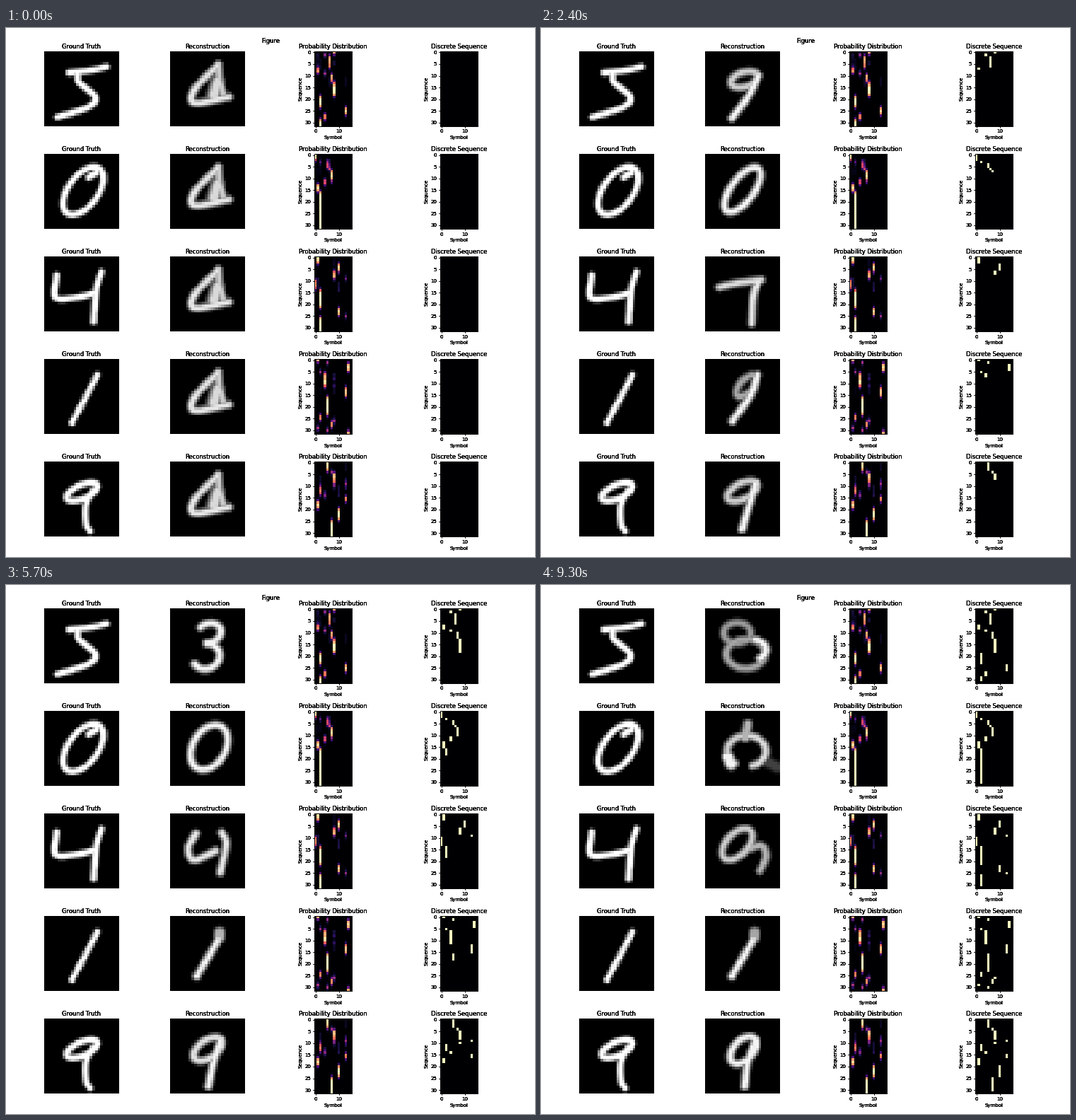
Recreate the animation shown at these times as a matplotlib script. Size 748 by 748 pixels, loop 9600 ms.

```python
import numpy as np
import matplotlib.pyplot as plt
from matplotlib.animation import FuncAnimation

STAGE, DPI = 748, 50
STEPS, SYMBOLS, GRID = 32, 16, 28
SIDE, LEFT, TOP = 105.8, 53.6, 32.8
COL_PITCH, ROW_PITCH = 178, 145.1
DIGITS = ("five", "zero", "four", "one", "nine")

grid_y, grid_x = np.mgrid[0:GRID, 0:GRID] + 0.5


def brush(x, y, w=1.35, soft=1.7, a=0.95):
    """Paint a sampled curve onto the pixel grid with a soft round tip."""
    dist = np.hypot(grid_x[..., None] - x, grid_y[..., None] - y).min(-1)
    return a * np.clip((w - dist) / soft + 0.5, 0, 1)


def line(*xy, **style):
    """Smooth curve through a few points."""
    p = np.array(xy, float).reshape(-1, 2)
    p = np.vstack([2 * p[0] - p[1], p, 2 * p[-1] - p[-2]])
    t = np.linspace(0, 1, 16)[:, None]
    curve = np.vstack([
        b + 0.5 * t * (c - q + t * (2 * q - 5 * b + 4 * c - d + t * (3 * (b - c) + d - q)))
        for q, b, c, d in zip(p, p[1:], p[2:], p[3:])])
    return brush(*curve.T, **style)


def arc(x, y, rx, ry, lean=0, start=0, end=1, **style):
    """Part of a leaning ellipse; angles in turns, clockwise from the right."""
    t = 2 * np.pi * np.linspace(start, end, 60)
    return brush(x + rx * np.cos(t) - lean * ry * np.sin(t), y + ry * np.sin(t), **style)


def merge(*strokes):
    return np.max(strokes, axis=0)


# Handwritten digits
pen = dict(w=1.2, soft=1.2, a=1)
truth = {
    "five": merge(line(23.2, 5.8, 18, 7, 9.3, 8, **pen),
                  line(12.7, 8, 13, 11.5, 19, 17, 16.5, 20.8, 5, 24.6, **pen)),
    "zero": merge(arc(14.6, 13.8, 6.4, 8.9, 0.45, **pen), line(19.5, 7, 16.6, 8.8, **pen)),
    "four": merge(line(4.7, 7, 4.3, 15.3, 12, 15.3, 18.5, 13.8, **pen),
                  line(21.4, 5.8, 19.5, 12.5, 18.5, 24.3, **pen)),
    "one": line(19.9, 6, 10.4, 23.8, **pen),
    "nine": merge(arc(14.2, 11.3, 4.6, 3.4, 1, **pen),
                  line(18.5, 10.5, 15.6, 16, 15.6, 23, 17.1, 26, **pen)),
}

# Guesses at key steps, faded into each other
first = merge(line(18, 5, 9, 14.5, 9.5, 19.3, 22, 17, a=0.9),
              line(18, 5, 18.5, 11, 20, 16, a=0.8),
              line(17.8, 11.5, 16.3, 16.5, w=2.3, soft=2.5, a=0.85))
slim = merge(arc(13.8, 13, 4.3, 7.9, 0.6, a=0.85), line(16.5, 9, 13, 19, a=0.55))
poses = {name: {0: first, 3: slim} for name in DIGITS}

three = merge(arc(14.5, 9.3, 4.4, 3.7, 0.2, -0.4, 0.25), arc(13.5, 18, 5, 4.7, 0.1, -0.25, 0.4))
poses["five"].update({
    8: merge(arc(14.7, 10.5, 4.7, 3, 0.6, a=0.8), line(20, 9, 16, 17, 10, 25)),
    12: merge(arc(16.5, 9.7, 4.2, 3.2, 0.5, a=0.85), arc(13, 18, 5.2, 4.8, 0.1, -0.25, 0.4)),
    19: three,
    26: three,
    31: merge(arc(12, 9.2, 5, 3.8, a=0.6), arc(15.2, 17, 7.2, 5.5, a=0.65),
              arc(17, 15.5, 5.8, 4, 0, -0.2, 0.15)),
})

for step in (8, 12, 19, 26):
    t = (step - 8) / 18
    poses["zero"][step] = arc(14 + t, 13.4 + 0.4 * t, 5 + 2.6 * t, 8.3, 0.55 - 0.45 * t)
poses["zero"][31] = merge(
    arc(15.5, 15, 7.2, 5.8, 0, -0.22, 0.2, a=0.85), arc(15.5, 15, 7.2, 5.8, 0, 0.35, 0.7, a=0.8),
    line(16, 5, 15, 10, w=1.7, a=0.7), line(8.5, 17, 9.7, 20, w=2),
    line(23, 19, 27, 21, w=2, a=0.25))

final_four = merge(arc(12, 11.5, 4.8, 5.8, 0.5, a=0.8),
                   line(16, 13.5, 21, 12, 22.8, 16, 20.5, 21.5, a=0.7))
poses["four"].update({
    3: merge(arc(13.7, 10.6, 4.4, 4.7, 0.1), arc(13.7, 18.5, 4.6, 4.6, 0.1, a=0.85)),
    8: merge(line(5.3, 11.5, 12, 10, 21, 8.8, a=0.85), line(20, 9.3, 18, 15, 17.4, 25, a=0.9)),
    12: merge(arc(10.5, 12.3, 3.6, 3, 0, 0.2, 0.8, a=0.6), line(11, 15, 18, 14.5, a=0.3),
              line(22.4, 7.4, 18.6, 14.5, 17.2, 24.3, a=0.85)),
    19: merge(line(9.7, 7.5, 6.8, 13, 9, 17.4, 17, 14, a=0.9),
              line(19.3, 7.2, 21, 11.5, 18.8, 22, a=0.9)),
    26: final_four,
    31: final_four,
})

poses["one"].update({
    8: merge(arc(15.5, 10, 3, 4, 0.6, a=0.65), line(19.6, 6, 17, 13.5, 10.2, 23.2)),
    12: line(19.8, 6, 10, 23.8),
})
for step, blob in ((19, 0.7), (26, 0.3), (31, 0.65)):
    poses["one"][step] = merge(line(18, 9, 10, 22.5), line(18.5, 6.2, 18.4, 8, w=2, a=blob))

for step in (8, 12, 19, 31):
    t = (step - 8) / 23
    poses["nine"][step] = merge(
        arc(14 + 0.3 * t, 11 + 0.8 * t, 4.7 - 0.4 * t, 3.8 + 1.3 * t, 0.8 - 0.35 * t, a=0.8 + 0.15 * t),
        line(19, 8, 16.6 - 0.6 * t, 16, 13.8 + t, 25.4))

# Long holds as (symbol, first step, count)
holds = {
    "five": ((6, 2, 5), (8, 14, 5), (2, 19, 5), (13, 24, 3), (2, 29, 3)),
    "zero": ((7, 7, 4), (1, 13, 3), (2, 16, 16)),
    "four": ((10, 3, 3), (8, 6, 3), (2, 14, 8), (10, 22, 3), (2, 26, 6)),
    "one": ((4, 6, 6), (13, 12, 4), (5, 16, 8)),
    "nine": ((8, 5, 4), (1, 17, 3), (10, 20, 5)),
}
rng = np.random.default_rng(8)


def sequence(name):
    """One-hot steps: the long holds, with short random runs between them."""
    symbols = rng.choice([0, 1, 2, 4, 5, 6, 7, 8, 13, 14], STEPS // 2)
    symbols = np.repeat(symbols, rng.integers(1, 4, STEPS // 2))
    symbols = np.resize(symbols, STEPS)
    for symbol, start, count in holds[name]:
        symbols[start:start + count] = symbol
    return np.eye(SYMBOLS)[symbols]


def likelihood(code):
    """Blur the steps in time and add a few faint rivals."""
    kernel = (0.1, 0.2, 0.4, 0.2, 0.1)
    padded = np.pad(code, ((2, 2), (0, 0)), mode="edge")
    p = sum(k * padded[i:i + STEPS] for i, k in enumerate(kernel))
    used = np.flatnonzero(code.any(0))
    for _ in range(5):
        start = rng.integers(0, 14)
        p[start:start + rng.integers(2, 6), rng.choice(used)] += rng.uniform(0.1, 0.25)
    p **= 1.5
    return p / p.sum(1, keepdims=True)


codes = {name: sequence(name) for name in DIGITS}


def guess(name, step):
    keys = sorted(poses[name])
    at = np.interp(step, keys, range(len(keys)))
    i = min(int(at), len(keys) - 2)
    f = at - i
    return (1 - f) * poses[name][keys[i]] + f * poses[name][keys[i + 1]]


def revealed(name, step):
    return codes[name] * (np.arange(STEPS) < step)[:, None]


def darken(*artists, times=4):
    """Draw artists repeatedly so that their soft edges grow heavier."""
    for artist in artists:
        def repeat(renderer, draw=artist.draw):
            for _ in range(times):
                draw(renderer)

        artist.draw = repeat


fig = plt.figure(figsize=(STAGE / DPI, STAGE / DPI), dpi=DPI, facecolor="white")
darken(fig.suptitle("Figure", y=1 - 14 / STAGE), times=6)


def panel(row, col, title, data, cmap):
    plain = cmap == "gray"
    width = SIDE if plain else SIDE / 2
    left = LEFT + COL_PITCH * col + (SIDE - width) / 2
    bottom = STAGE - TOP - ROW_PITCH * row - SIDE
    ax = fig.add_axes([v / STAGE for v in (left, bottom, width, SIDE)])
    image = ax.imshow(data, cmap=cmap, vmin=0, vmax=1, aspect="auto", interpolation="nearest")
    darken(ax.set_title(title))
    if plain:
        ax.axis("off")
        return image
    ax.set_xticks([0, 10])
    ax.set_yticks(range(0, STEPS, 5))
    darken(ax.set_xlabel("Symbol"), ax.set_ylabel("Sequence"), *ax.spines.values())
    for axis in (ax.xaxis, ax.yaxis):
        for tick in axis.get_major_ticks():
            darken(tick.label1, tick.tick1line)
    return image


guesses, sequences = {}, {}
for row, name in enumerate(DIGITS):
    panel(row, 0, "Ground Truth", truth[name], "gray")
    guesses[name] = panel(row, 1, "Reconstruction", guess(name, 0), "gray")
    panel(row, 2, "Probability Distribution", likelihood(codes[name]), "magma")
    sequences[name] = panel(row, 3, "Discrete Sequence", revealed(name, 0), "magma")


def update(step):
    for name in DIGITS:
        guesses[name].set_data(guess(name, step))
        sequences[name].set_data(revealed(name, step))
    return [*guesses.values(), *sequences.values()]


anim = FuncAnimation(fig, update, frames=STEPS, interval=300, repeat=True, repeat_delay=0)
plt.show()
```
